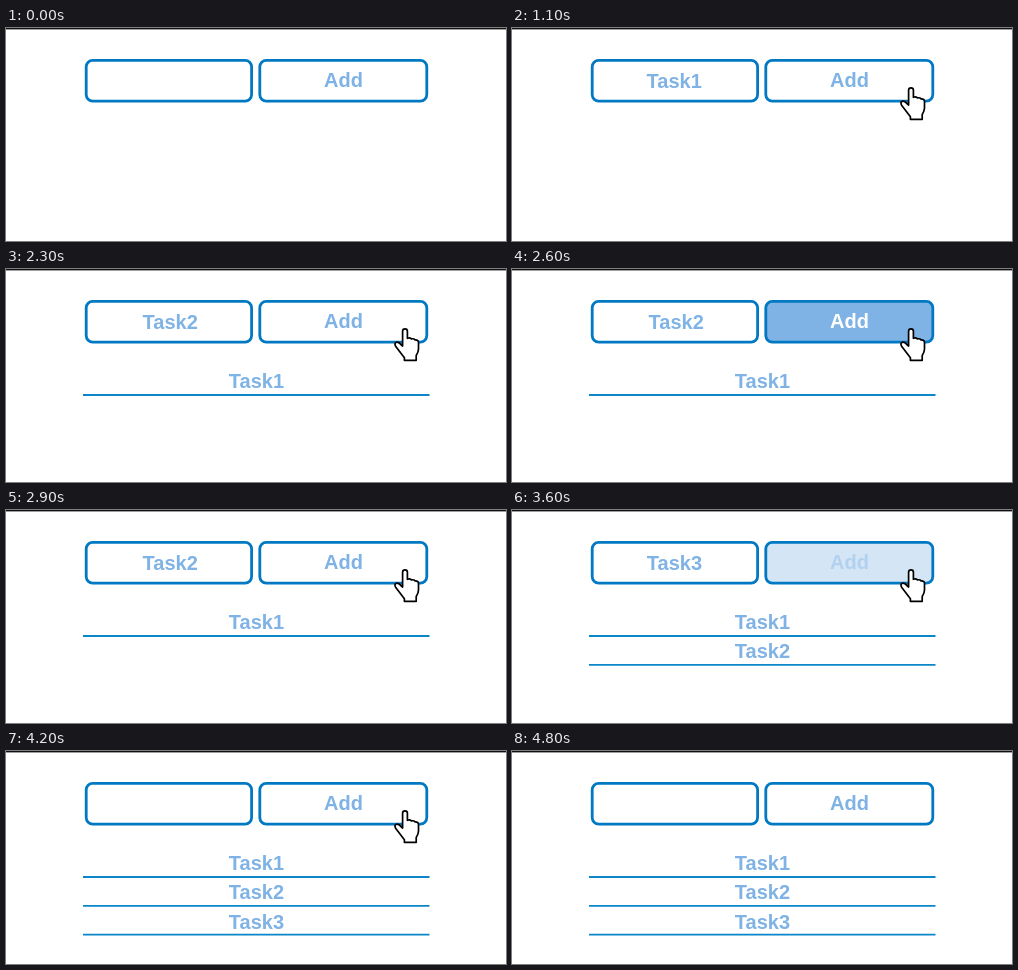
Animation, 500 px wide and 213 px high, one loop 6.8 s. Source, as an HTML page:

```html
<!DOCTYPE html>
<html lang="en">
<head>
<meta charset="utf-8">
<title>Task list</title>
<style>
html, body { margin: 0; width: 100%; height: 100%; overflow: hidden; background: #fff; }
svg { display: block; width: 100%; height: 100%; }
text { font: bold 20px "Liberation Sans", Arial, sans-serif; fill: #7fb2e5; }
.box { fill: #fff; stroke: #0079c2; stroke-width: 2.8; }
.item line { stroke: #0a86c9; stroke-width: 1.8; }
</style>
</head>
<body>
<svg viewBox="0 0 500 213">
  <rect width="500" height="1.4" fill="#111"/>
  <rect class="box" x="80.2" y="32.3" width="165.4" height="40.8" rx="6.5"/>
  <rect class="box" id="button" x="253.8" y="32.3" width="167" height="40.8" rx="6.5"/>
  <text id="input" y="60.3"></text>
  <text id="label" x="318" y="59">Add</text>
  <g class="item"><text x="222.8" y="119.3">Task1</text><line x1="77" x2="423.5" y1="126" y2="126"/></g>
  <g class="item"><text x="222.8" y="148.3">Task2</text><line x1="77" x2="423.5" y1="154.8" y2="154.8"/></g>
  <g class="item"><text x="222.8" y="178.3">Task3</text><line x1="77" x2="423.5" y1="183.6" y2="183.6"/></g>
  <path id="hand" fill="#fff" stroke="#000" stroke-width="1.7" stroke-linejoin="round"
    d="M396.6 77V62.2q0-2.4 2.4-2.4t2.4 2.4V69.3q2.4-1 4 .6q2.4-.6 3.7 1q3.3-.2 3.4 2.6V80q0 3-2.3 6.5V91.3H398.4V88.8L389.6 77.2q-1.6-3 .8-4q2.4-.3 4 1.8z"/>
</svg>
<script>
const $ = id => document.getElementById(id);
const items = document.querySelectorAll(".item");
const STEP = 100, LOOP = 6800;

// Steps at which each task starts typing, is clicked and joins the list
const tasks = [
  { name: "Task1", x: 134.6, type: 1, click: 11, add: 18 },
  { name: "Task2", x: 136.6, type: 19, click: 23, add: 30 },
  { name: "Task3", x: 134.8, type: 31, click: 35, add: 42 }
];

const mix = (a, b, k) => `rgb(${a.map((v, i) => Math.round(v + (b[i] - v) * k))})`;
const WHITE = [255, 255, 255], BLUE = [127, 178, 229];

function draw(now) {
  const s = Math.floor(now % LOOP / STEP);
  let glow = 0, typed = "";
  tasks.forEach((task, i) => {
    items[i].style.display = s >= task.add ? "" : "none";
    if (s >= task.type && s < task.add) {
      typed = task.name.slice(0, s - task.type + 1);
      $("input").setAttribute("x", task.x);
    }
    glow = Math.max(glow, 1 - Math.abs(s - task.click - 3) / 3);
  });
  $("input").textContent = typed;
  $("button").style.fill = mix(WHITE, BLUE, glow);
  $("label").style.fill = mix(BLUE, WHITE, Math.min(1, glow * 1.2));

  // The hand slides in from the lower right and leaves straight to the right
  const dx = 20 * Math.max(0, 11 - s, s - 42);
  const dy = s < 11 ? Math.min(5, dx / 16) : 0;
  $("hand").setAttribute("transform", `translate(${dx} ${dy})`);
  $("hand").style.display = s >= 6 && s < 48 ? "" : "none";
}

const start = performance.now();
(function tick() {
  draw(performance.now() - start);
  requestAnimationFrame(tick);
})();
</script>
</body>
</html>
```
